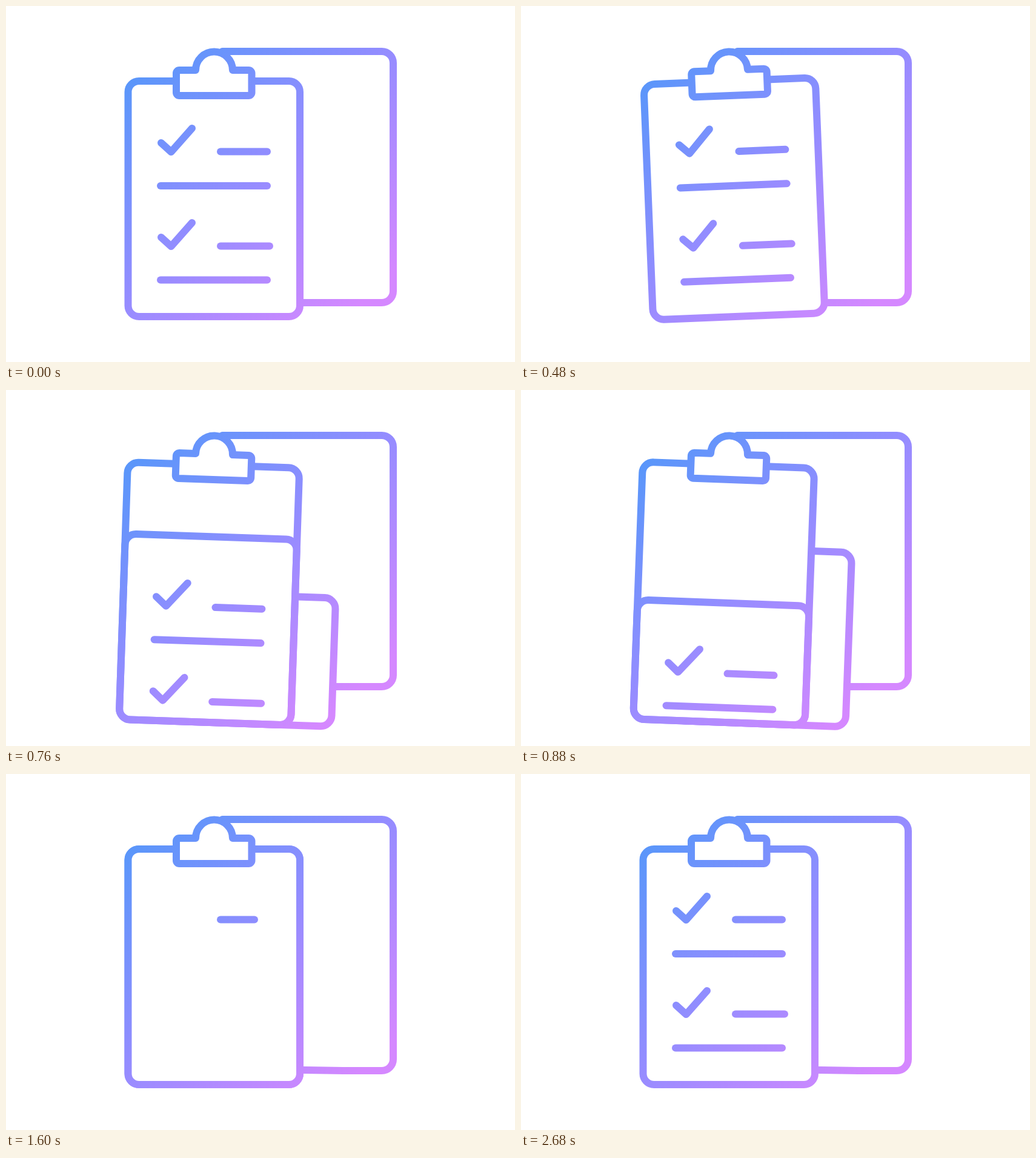
An HTML page with a canvas that plays this animation: 840 px wide and 588 px high, repeating every 3000 ms.

```html
<!DOCTYPE html>
<html lang="en">
<head>
<meta charset="utf-8">
<title>Clipboard checklist</title>
<style>
  html, body { margin: 0; width: 100%; height: 100%; overflow: hidden; background: #fff; }
  canvas { display: block; }
</style>
</head>
<body>
<canvas id="stage" width="840" height="588"></canvas>
<script>
const ctx = document.getElementById('stage').getContext('2d');
const LOOP = 3000, STEP = 40;
const LEFT = 201.5, RIGHT = 485, TOP = 124, BOTTOM = 513;
const SHEET_GAP = 67, STRETCH = 36, RADIUS = 18;
const PIVOT = { x: 343.5, y: 106 };

const gradient = ctx.createLinearGradient(201, 130, 563, 514);
gradient.addColorStop(0, '#5b96fa');
gradient.addColorStop(0.5, '#968cff');
gradient.addColorStop(1, '#d588ff');

// time, degrees
const SWING = [[0, 0], [310, 3.9], [570, -4.6], [800, 2.45], [1140, 0]];

// Marks in drawing order
const shortLine = (y, end) => [[354, y], [end, y]];
const longLine = y => [[255, y], [431, y]];
const check = y => [[256, y], [272.5, y + 15], [307, y - 24]];
const MARKS = [
  shortLine(240.5, 431), longLine(297),
  shortLine(396.5, 435), longLine(452.5),
  check(226), check(382)
];

const progress = (t, start, end) => Math.min(1, Math.max(0, (t - start) / (end - start)));
const easeInOut = u => (1 - Math.cos(Math.PI * u)) / 2;
const easeOut = u => 1 - (1 - u) ** 2;
const easeInBack = u => 2.7 * u ** 3 - 1.7 * u ** 2;

function swingAt(t) {
  for (let i = 1; i < SWING.length; i++) {
    const [t0, a] = SWING[i - 1], [t1, b] = SWING[i];
    if (t < t1) return (a + (b - a) * easeInOut(progress(t, t0, t1))) * Math.PI / 180;
  }
  return 0;
}

function paint(path) {
  ctx.fill(path);
  ctx.stroke(path);
}

function panel(left, top, right, bottom) {
  const path = new Path2D();
  if (bottom > top) path.roundRect(left, top, right - left, bottom - top, RADIUS);
  return path;
}

function drawMark(points, amount) {
  if (amount <= 0) return;
  const path = new Path2D();
  let length = 0;
  points.forEach(([x, y], i) => {
    path.lineTo(x, y);
    if (i) length += Math.hypot(x - points[i - 1][0], y - points[i - 1][1]);
  });
  if (amount < 1) ctx.setLineDash([length * amount, 999]);
  ctx.stroke(path);
  ctx.setLineDash([]);
}

function drawBack(t) {
  const path = new Path2D();
  path.moveTo(357, 75);
  path.arcTo(639, 75, 639, 490, RADIUS + 1);
  path.arcTo(639, 490, 480, 490, RADIUS + 1);
  path.lineTo(556, 490);
  path.lineTo(480, t < 1160 ? 490 : 488.7);
  ctx.stroke(path);
}

function drawClip() {
  const path = new Path2D();
  path.arc(PIVOT.x, 106, 30.5, Math.PI, 0);
  path.arcTo(405.5, 106, 405.5, 148, 5);
  path.arcTo(405.5, 148, 281, 148, 5);
  path.arcTo(281, 148, 281, 106, 5);
  path.arcTo(281, 106, 313, 106, 5);
  path.closePath();
  paint(path);
}

function drawSheet(t, bottom) {
  if (t < 450 || t >= 1640) return;
  const top = TOP + 425 * (1 - progress(t, 446, 1130)) ** 1.126;
  const shift = SHEET_GAP * (1 - easeInBack(progress(t, 1300, 1600)));
  paint(panel(LEFT + shift, top, RIGHT + shift, bottom));
}

function drawPage(t, board, bottom) {
  const leaving = t < 1160;
  const offset = leaving ? 418 * easeInOut(progress(t, 510, 1210)) : 0;
  ctx.save();
  ctx.clip(board);
  ctx.translate(0, offset);
  MARKS.forEach((points, i) => {
    const start = 1440 + i * 181;
    drawMark(points, leaving ? 1 : easeOut(progress(t, start, start + 335)));
  });
  ctx.restore();
  if (offset) ctx.stroke(panel(LEFT, TOP + offset, RIGHT, bottom));
}

function draw(t) {
  ctx.globalCompositeOperation = 'source-over';
  ctx.fillStyle = '#fff';
  ctx.strokeStyle = '#000';
  ctx.lineWidth = 12;
  ctx.lineCap = ctx.lineJoin = 'round';
  ctx.fillRect(0, 0, 840, 588);
  drawBack(t);

  ctx.save();
  ctx.translate(PIVOT.x, PIVOT.y);
  ctx.rotate(swingAt(t));
  ctx.translate(-PIVOT.x, -PIVOT.y);
  const bottom = BOTTOM + STRETCH * (progress(t, 510, 630) - progress(t, 1000, 1160));
  const board = panel(LEFT, TOP, RIGHT, bottom);
  drawSheet(t, bottom);
  paint(board);
  drawPage(t, board, bottom);
  drawClip();
  ctx.restore();

  // Screen blending tints the black strokes and keeps white areas white
  ctx.globalCompositeOperation = 'screen';
  ctx.fillStyle = gradient;
  ctx.fillRect(0, 0, 840, 588);
}

const begin = performance.now();
function tick() {
  const t = (performance.now() - begin) % LOOP;
  draw(Math.floor(t / STEP) * STEP);
  requestAnimationFrame(tick);
}
tick();
</script>
</body>
</html>
```
